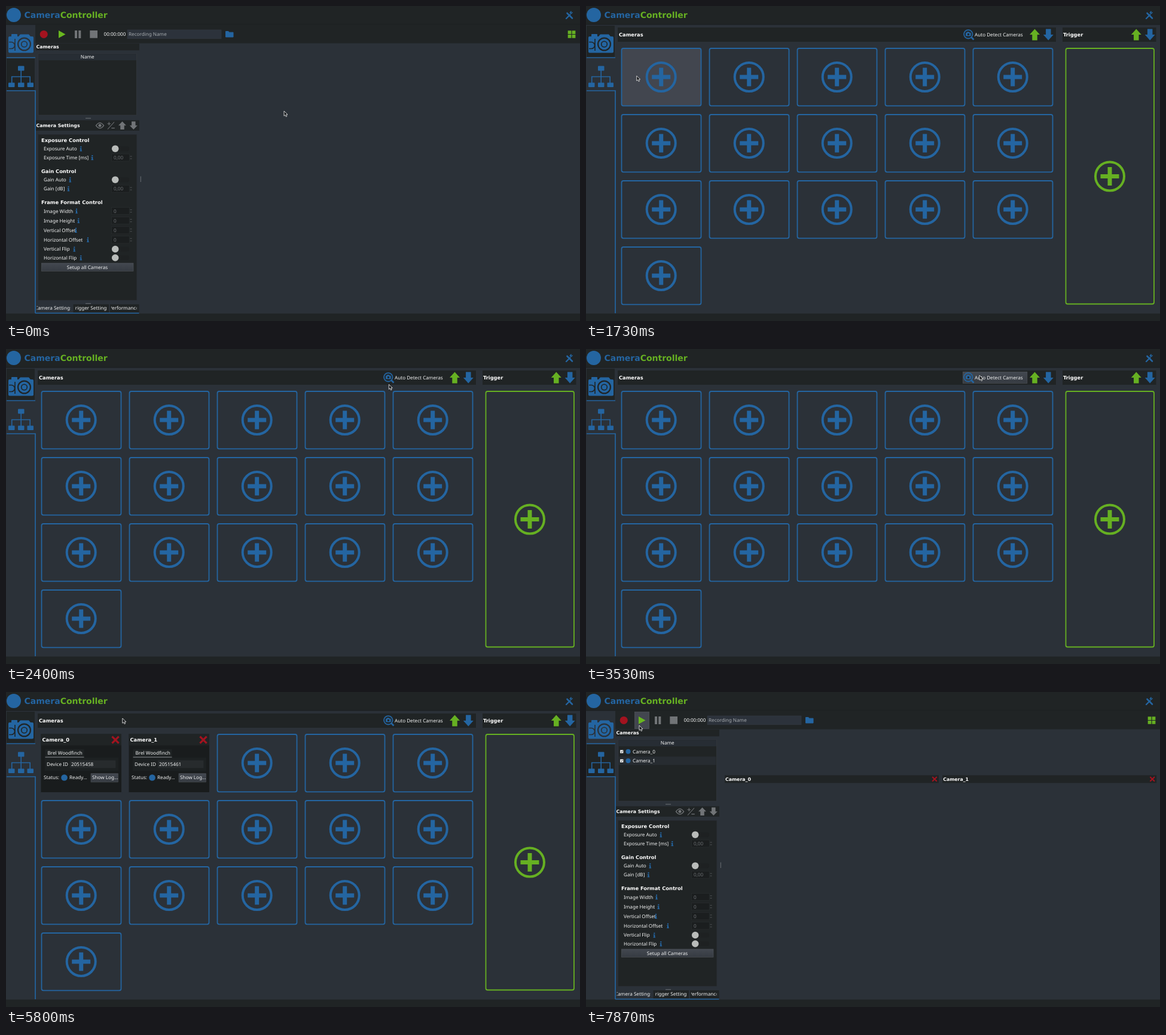
These frames come from a looping animation (960 px wide and 528 px high, 8 s). An HTML page:

```html
<!DOCTYPE html>
<html lang="en">
<head>
<meta charset="utf-8">
<title>CameraController</title>
<style>
  html, body { margin: 0; width: 100%; height: 100%; overflow: hidden; background: #2b3138; }
  svg { display: block; width: 960px; height: 528px; }
  text { font: 8.15px "Noto Sans", "Open Sans", sans-serif; fill: #f2f3f3; text-rendering: geometricPrecision; white-space: pre; }
  text.b { font-family: "DejaVu Sans", sans-serif; font-weight: 700; fill: #fff; }
</style>
</head>
<body>
<svg id="stage" viewBox="0 0 960 528"></svg>
<script>
const BG = '#2b3138', DARK = '#202425', BLUE = '#2465a1', GREEN = '#66b022',
      RED = '#a3131f', GREY = '#717477', HOVER = '#42464f';
const LOOP = 8000, STEP = 1000 / 15;

// --- drawing helpers: y of text is its optical middle ---
const rect = (x, y, w, h, fill, more = '') =>
  `<rect x="${x}" y="${y}" width="${w}" height="${h}" fill="${fill}" ${more}/>`;
const dot = (x, y, r, fill, more = '') => `<circle cx="${x}" cy="${y}" r="${r}" fill="${fill}" ${more}/>`;
const path = (d, fill, more = '') => `<path d="${d}" fill="${fill}" ${more}/>`;
const line = (d, color, w = 1, more = '') => path(d, 'none', `stroke="${color}" stroke-width="${w}" ${more}`);
const text = (x, y, s, more = '') => `<text x="${x}" y="${y + 2.9}" ${more}>${s}</text>`;
const bold = (x, y, s, size = 8.3) =>
  `<text class="b" x="${x}" y="${y + 3}" style="font-size:${size}px">${s}</text>`;
const group = (id, body, more = '') => `<g id="${id}" ${more}>${body}</g>`;
const hidden = 'visibility="hidden"';

const arrow = (x, y, w, h, fill, down) => path(
  `M${x} ${y - h / 2}l${w / 2} ${h / 2}h${-w / 4}v${h / 2}h${-w / 2}v${-h / 2}h${-w / 4}z`,
  fill, down ? `transform="rotate(180 ${x} ${y})"` : '');
const plus = (x, y, color) => dot(x, y, 24, 'none', `stroke="${color}" stroke-width="4"`) +
  line(`M${x - 15.5} ${y}h31M${x} ${y - 15.5}v31`, color, 7);
const cross = (x, y, r, w) => line(`M${x - r} ${y - r}l${2 * r} ${2 * r}m0 ${-2 * r}l${-2 * r} ${2 * r}`, RED, w);
const info = (x, y) => rect(x - 1, y - 4, 2, 2, BLUE) +
  path(`M${x - 1.7} ${y - 1}h2.7v4h.8v1.2h-3.6v-1.2h.8v-2.8h-.7z`, BLUE);

// --- parts shared by both pages ---
function header() {
  return rect(0, 0, 960, 31, DARK) + rect(0, 30.5, 960, 1, '#1a1d1f') +
    dot(13, 15, 12, BLUE) +
    `<text class="b" x="30.5" y="20" style="font-size:14px;fill:${BLUE}">Camera<tspan fill="${GREEN}">Controller</tspan></text>` +
    line('M938.5 12l8.5 8.5', BLUE, 2.6, 'stroke-linecap="round"') +
    line('M937 21l6.5-6.5', BLUE, 2.4, 'stroke-linecap="round"') +
    line('M947.5 10.5l-2.4 2.2-1.6-1.6 2-2.2', BLUE, 1.6) +
    rect(0, 515.5, 960, 12.5, DARK);
}

function sideTabs() {
  const camera = rect(4, 51, 42, 27.5, BLUE, 'rx="2"') + rect(9, 47, 10, 5, BLUE, 'rx="1"') +
    path('M21 51l3-3.5h14l3 3.5z', BLUE) +
    dot(30.5, 64, 11.5, 'var(--bg)') + dot(30.5, 64, 9.3, BLUE) + dot(30.5, 64, 5.6, 'var(--bg)') + dot(30.5, 64, 4, BLUE) +
    line('M5 60.5h4a5 5 0 0 1 0 11h-4M15 55v20', 'var(--bg)', 1.6);
  const tree = rect(20, 100.5, 10.5, 8, BLUE, 'rx="1"') +
    [4, 20, 35.5].map(x => rect(x, 128.5, 10.5, 7.5, BLUE, 'rx="1"')).join('') +
    line('M25.2 108v21M9.7 129v-10.5h30.5v10.5', BLUE, 1.6);
  return group('tab0', rect(1, 33, 47, 53, 'var(--bg)') + camera) +
    group('tab1', rect(1, 88, 47, 53, 'var(--bg)') + tree) +
    line('M1 86.5h48M1 142h48v373', BLUE, 1.7);
}

// --- recording page ---
function toolbar() {
  return rect(49, 31, 911, 31.5, DARK) +
    rect(51, 33.5, 24, 28, HOVER, `id="recHover" ${hidden}`) +
    rect(81.5, 33.5, 24, 28, HOVER, `id="playHover" stroke="#53575c" stroke-width=".7" ${hidden}`) +
    dot(63.2, 47.4, 6.5, RED) + path('M88 41l11.5 6.4-11.5 6.4z', '#69b81f') +
    rect(115, 41, 4, 13, GREY) + rect(121.3, 41, 4, 13, GREY) + rect(140.3, 41, 12.7, 12.7, GREY) +
    text(163.5, 47.3, '00:00:000') +
    rect(203, 40, 157, 14.8, '#2c323b', 'stroke="#353b43" stroke-width=".6"') +
    text(205, 47.3, 'Recording Name', 'style="fill:#a6abaf"') +
    path('M367.5 42.5h4.5l1.5 1.7h6.5v7.8h-12.5z', BLUE, `stroke="${BLUE}" stroke-linejoin="round"`) +
    [939.7, 946.6].map(x => rect(x, 41.3, 5.8, 5.7, GREEN) + rect(x, 48, 5.8, 5.7, GREEN)).join('');
}

function cameraList() {
  const rows = [0, 1].map(i => {
    const y = 99.8 + 15.5 * i;
    return (i ? rect(54.5, y - 7, 163, 14, '#272c31') : '') +
      rect(57, y - 2.6, 5.4, 5.4, '#eef0f0', 'rx=".6"') + line(`M58.2 ${y}l1.2 1.3 2-2.5`, '#30353a', .9) +
      dot(70.5, y, 4, BLUE) + text(78, y, 'Camera_' + i);
  }).join('');
  const views = [0, 1].map(i => {
    const x = 232 + 364.2 * i;
    return rect(x, 139.5, 358, 13, DARK) + bold(x + 1, 145.8, 'Camera_' + i, 7.8) + cross(x + 351, 146, 3.8, 2);
  }).join('');
  return rect(50, 63, 173, 11.3, DARK) + bold(50.5, 68.3, 'Cameras', 7.8) +
    rect(54, 80, 164.5, 103, DARK, 'stroke="#363b41" stroke-width=".7"') +
    rect(54.5, 80.5, 163.5, 10.5, '#272d34') + text(136.2, 85.4, 'Name', 'text-anchor="middle"') +
    group('found', rows + views, hidden);
}

const spin = (y, s) => rect(176.5, y - 6, 30, 12, '#1b1e1f', 'stroke="#2b2f31" stroke-width=".6"') +
  text(180, y, s, 'style="fill:#6c7073"') + line(`M207.5 ${y - 2}h3M207.5 ${y + 2}h3`, '#55595c', .9);
const toggle = y => rect(183, y - 4, 23, 8, '#1e2122', 'rx="4"') + dot(182.7, y, 5.8, '#b9bcba');

function settings() {
  const rows = [
    [239.2, 'Exposure Auto', 125.3], [254, 'Exposure Time [ms]', 144.3, '0,00'],
    [291.2, 'Gain Auto', 107.3], [306.2, 'Gain [dB]', 104.5, '0,00'],
    [343.6, 'Image Width', 118, '0'], [359.7, 'Image Height', 121.3, '0'],
    [375.8, 'Vertical Offset', 117, '0'], [391.8, 'Horizontal Offset', 137, '0'],
    [407.5, 'Vertical Flip', 114.3], [422, 'Horizontal Flip', 125.3]
  ].map(([y, s, ix, val]) => text(63, y, s) + info(ix, y) + (val ? spin(y, val) : toggle(y))).join('');
  const tools = path('M150.5 200.4q6.5-9 13 0q-6.5 9-13 0z', 'none', `stroke="${GREY}" stroke-width="1.4"`) +
    dot(157, 200.2, 2.5, GREY) +
    line('M169.5 197.3h5.6m-2.8-2.8v5.6M176.3 204.6h5.5M170 206.5l11-12', GREY, 1.1) +
    arrow(194.5, 200.3, 13, 13.5, GREY) + arrow(213.3, 200.3, 13, 13.5, GREY, true);
  return rect(133, 187.5, 9, 1.4, '#5b6065') +
    rect(50, 191.5, 173, 17.5, DARK) + bold(50.5, 200.2, 'Camera Settings', 7.8) + tools +
    rect(54, 215.5, 164.5, 277.5, DARK, 'stroke="#252a2d" stroke-width=".7"') +
    bold(59, 225.2, 'Exposure Control') + bold(59, 277.2, 'Gain Control') + bold(59, 329, 'Frame Format Control') +
    rows + rect(59.3, 431, 153.7, 13.3, 'url(#btn)', 'stroke="#50555b" stroke-width=".6"') +
    text(136, 437.6, 'Setup all Cameras', 'text-anchor="middle"');
}

function dockTabs() {
  const tabs = [[51.5, 56, 79.5, 'Camera Settings'], [116, 52.8, 142, 'Trigger Settings'], [176, 42.5, 197, 'Performance']];
  return rect(133, 498, 9, 1.4, '#5b6065') + rect(112.5, 500, 59.5, 14, DARK) + rect(174, 500, 48.5, 14, DARK) +
    tabs.map(([x, w, mid, s], i) => `<clipPath id="clip${i}">${rect(x, 498, w, 16, '#000')}</clipPath>` +
      text(mid, 506.5, s, `text-anchor="middle" clip-path="url(#clip${i})"`)).join('') +
    line('M49 514.7h173.5', BLUE, 1.5) + rect(224.8, 285.5, 1, 9.5, '#6a6f74');
}

// --- connection page ---
const cells = Array.from({ length: 16 }, (_, i) => ({ x: 59.5 + 147 * (i % 5), y: 71 + 111 * Math.floor(i / 5) }));

function card(i) {
  const x = 147 * i;
  return `<g transform="translate(${x} 0)">` + rect(57.5, 69, 137, 101, BG) +
    rect(58.5, 70.5, 134.5, 97.5, '#191c1d') + rect(58.5, 70.5, 134.5, 19, DARK) +
    bold(60.5, 80, 'Camera_' + i) + cross(183, 80.2, 5.6, 3.2) +
    rect(65.5, 96, 65, 13, '#1f2324') + rect(65.5, 108.7, 65, 1, '#8b8f92') +
    rect(65, 110, 123, 22.5, '#1d2122') +
    text(69.5, 102.4, 'Brel Woodfinch') + text(68, 121, 'Device ID') +
    rect(107, 114.5, 76.5, 13, '#272b2d') + text(109, 121, i ? '20515461' : '20515458') +
    text(63, 143.5, 'Status:') + dot(97.5, 143.5, 5.3, BLUE) + text(106, 143.5, 'Ready...') +
    rect(142, 136.7, 45.5, 14.3, 'url(#btn)', 'stroke="#4b5056" stroke-width=".6"') + text(144, 143.5, 'Show Log...') + '</g>';
}

function connection() {
  const find = rect(630.3, 38.3, 107.5, 19, 'url(#btn)', `id="findHover" stroke="#50555b" stroke-width=".7" ${hidden}`) +
    dot(639.3, 47.3, 7.2, 'none', `stroke="${BLUE}" stroke-width="1.8"`) + line('M644.5 52.5l4 4', BLUE, 2.6) +
    rect(635, 44.5, 8.8, 6, BLUE, 'rx="1"') + rect(637, 43.3, 4, 2, BLUE) + dot(639.5, 47.5, 1.7, DARK) +
    text(650, 47.8, 'Auto Detect Cameras');
  return rect(53, 36, 733, 24, DARK) + bold(55, 48, 'Cameras') + find +
    arrow(750.5, 48, 17, 19, GREEN) + arrow(773.3, 48, 17, 19, BLUE, true) +
    rect(797, 36, 156.5, 24, DARK) + bold(798, 48, 'Trigger') +
    arrow(920.3, 48, 17, 19, GREEN) + arrow(943.2, 48, 17, 19, BLUE, true) +
    cells.map(({ x, y }, i) =>
      rect(x, y, 133, 96.3, BG, `id="cell${i}" rx="3" stroke="${BLUE}" stroke-width="1.8"`) +
      plus(x + 66.2, y + 48, BLUE)).join('') +
    rect(802.5, 71, 147.5, 428.5, 'none', `rx="3" stroke="${GREEN}" stroke-width="1.8"`) + plus(876, 285.5, GREEN) +
    group('cards', card(0) + card(1), hidden);
}

const stage = document.getElementById('stage');
stage.innerHTML = `<defs><linearGradient id="btn" x1="0" y1="0" x2="0" y2="1">
  <stop offset="0" stop-color="#434850"/><stop offset="1" stop-color="#363b42"/></linearGradient></defs>` +
  rect(0, 0, 960, 528, BG) + header() +
  group('record', toolbar() + cameraList() + settings() + dockTabs()) +
  group('connect', connection()) + sideTabs() +
  group('cursor', path('M0 0v8.3l1.9-1.7 1.4 3 1.5-.7-1.3-2.9h2.5z', '#17191b', 'stroke="#f4f4f4" stroke-width=".8"'));

// --- motion: time, x, y of the pointer tip ---
const track = [
  [0, 465, 176], [67, 465, 176], [870, 35, 121], [1270, 35, 121], [1600, 50, 120], [1870, 120, 114],
  [2000, 245, 106], [2067, 325, 101], [2133, 418, 97], [2200, 496, 82], [2333, 610, 64], [2533, 700, 50],
  [2867, 750, 43], [3000, 640, 43], [3267, 658, 44], [5000, 658, 44], [5267, 600, 46], [5800, 195, 44],
  [6200, 41, 58], [6667, 41, 58], [7533, 89, 56], [LOOP, 89, 56]
];

function pointer(t) {
  const i = Math.max(1, track.findIndex(k => k[0] > t));
  const [t0, x0, y0] = track[i - 1], [t1, x1, y1] = track[i];
  let p = (t - t0) / (t1 - t0);
  if (t1 - t0 > 500) p = p * p * (3 - 2 * p);
  return [x0 + (x1 - x0) * p, y0 + (y1 - y0) * p];
}

const el = id => document.getElementById(id);
const show = (id, on) => el(id).setAttribute('visibility', on ? 'visible' : 'hidden');
const setDisplay = (id, on) => { el(id).style.display = on ? '' : 'none'; };

function draw(now) {
  const t = Math.floor((now % LOOP + 4) / STEP) * STEP % LOOP + .5;
  const [x, y] = pointer(t);
  const over = (l, top, w, h) => x >= l && x < l + w && y >= top && y < top + h;
  const connecting = t >= 1266 && t < 6333;
  setDisplay('record', !connecting);
  setDisplay('connect', connecting);
  show('found', t >= 6333);
  show('cards', t >= 5000);
  show('findHover', t >= 3266 && t < 5000);
  show('recHover', over(51, 33, 24, 29));
  show('playHover', over(81, 33, 24, 29));
  cells.forEach((c, i) => el('cell' + i).setAttribute('fill', over(c.x, c.y, 133, 96) ? HOVER : BG));
  el('tab0').style.setProperty('--bg', !connecting || over(0, 33, 49, 53) ? BG : DARK);
  el('tab1').style.setProperty('--bg', connecting || over(0, 88, 49, 53) ? BG : DARK);
  el('cursor').setAttribute('transform', `translate(${x.toFixed(1)} ${y.toFixed(1)})`);
}

const start = performance.now();
function tick() {
  draw(performance.now() - start);
  requestAnimationFrame(tick);
}
tick();
</script>
</body>
</html>
```
